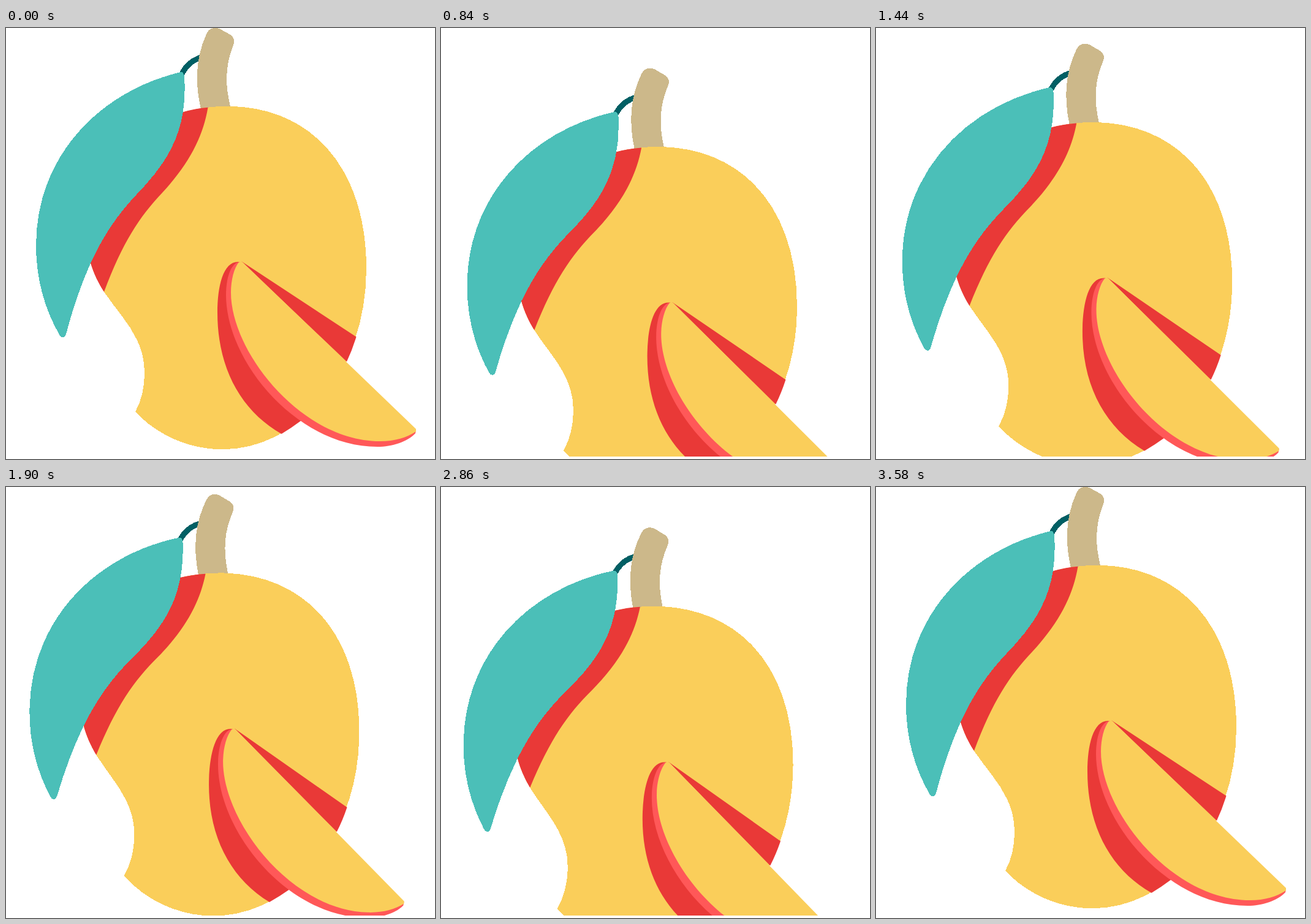
Recreate the animation shown at these times as an HTML page. Size 700 by 704 pixels, loop 3600 ms.

```html
<!DOCTYPE html>
<html lang="en">
<head>
<meta charset="utf-8">
<title>Mango</title>
<style>
  html, body { margin: 0; width: 100%; height: 100%; overflow: hidden; background: #fff; }
  svg { display: block; width: 700px; height: 700px; overflow: hidden; }
  .crisp { shape-rendering: crispEdges; }
</style>
</head>
<body>
<svg viewBox="0 0 700 700">
  <g id="mango">
    <path class="crisp" fill="none" stroke="#005f64" stroke-width="9" d="M286 77Q297 53 322 47"/>
    <path class="crisp" fill="#ccb88a" d="M318 132C307 85 311 45 327 10C331 0 341 -3 350 2L366 11C372 15 374 21 371 28C359 58 356 88 366.5 130Z"/>
    <path class="crisp" fill="#face5a" d="M365 127.8C500 130 588 230 588 393C588 560 480 688 353 688.3C297 688 246 664 211 627
      C222 607 226 585 226 563C226 505 188 473 160 431C151 417 143 401 138 384C120 330 170 170 288 137.5C313 130.5 340 127.5 365 127.8Z"/>
    <path fill="#e93937" d="M329.5 129.8C322 175 301 219 256 268C217 309 190 351 160 431
      C151 417 143 401 138 384C120 330 170 170 288 137.5Q309 131.5 329.5 129.8Z"/>
    <path class="crisp" fill="#4bbfb8" d="M283 72.5C150 105 49 212 49 355C49 408 62 457 87 501C90 507 96 507 98 500
      C109 458 122 420 138 384C160 337 182 305 213 272C262 221 297 170 291 80Q290 70 283 72.5Z"/>
    <path fill="#e93937" d="M384 381L571.5 504.5Q565 526 556 545Z
      M380 382C355 380 345 420 345 465C345 555 383 625 449.5 663Q466 653 482 641Z"/>
    <path fill="#ff5858" d="M381 382C366 384 359 410 359 436C359 545 475 684 606 684C630 684 655 676 668 662L669 656Z"/>
    <path fill="#face5a" d="M380 382.5C372 392 367 412 367 432C367 530 483 675 610 675C635 675 654 669 669 659V655L386 382.5Z"/>
  </g>
</svg>
<script>
  const LOOP = 3600, SPAN = 3580;
  const mango = document.getElementById('mango');

  // Smooth swing from 0 to 1 and back, with an optional lead in ms
  const wave = (t, period, lead) => (1 - Math.cos(2 * Math.PI * (t + lead) / period)) / 2;
  const swing = (t, period, lead = 0) => wave(t, period, lead) - wave(0, period, lead);

  function draw(now) {
    const t = Math.floor(now % LOOP / 20) * 20 % SPAN;
    const y = 60.4 * swing(t, SPAN / 2);
    const turn = 2.06 * swing(t, SPAN / 3, 50);
    mango.setAttribute('transform', `translate(0 ${y}) rotate(${turn})`);
  }

  const start = performance.now();
  function tick() {
    draw(performance.now() - start);
    requestAnimationFrame(tick);
  }
  tick();
</script>
</body>
</html>
```
